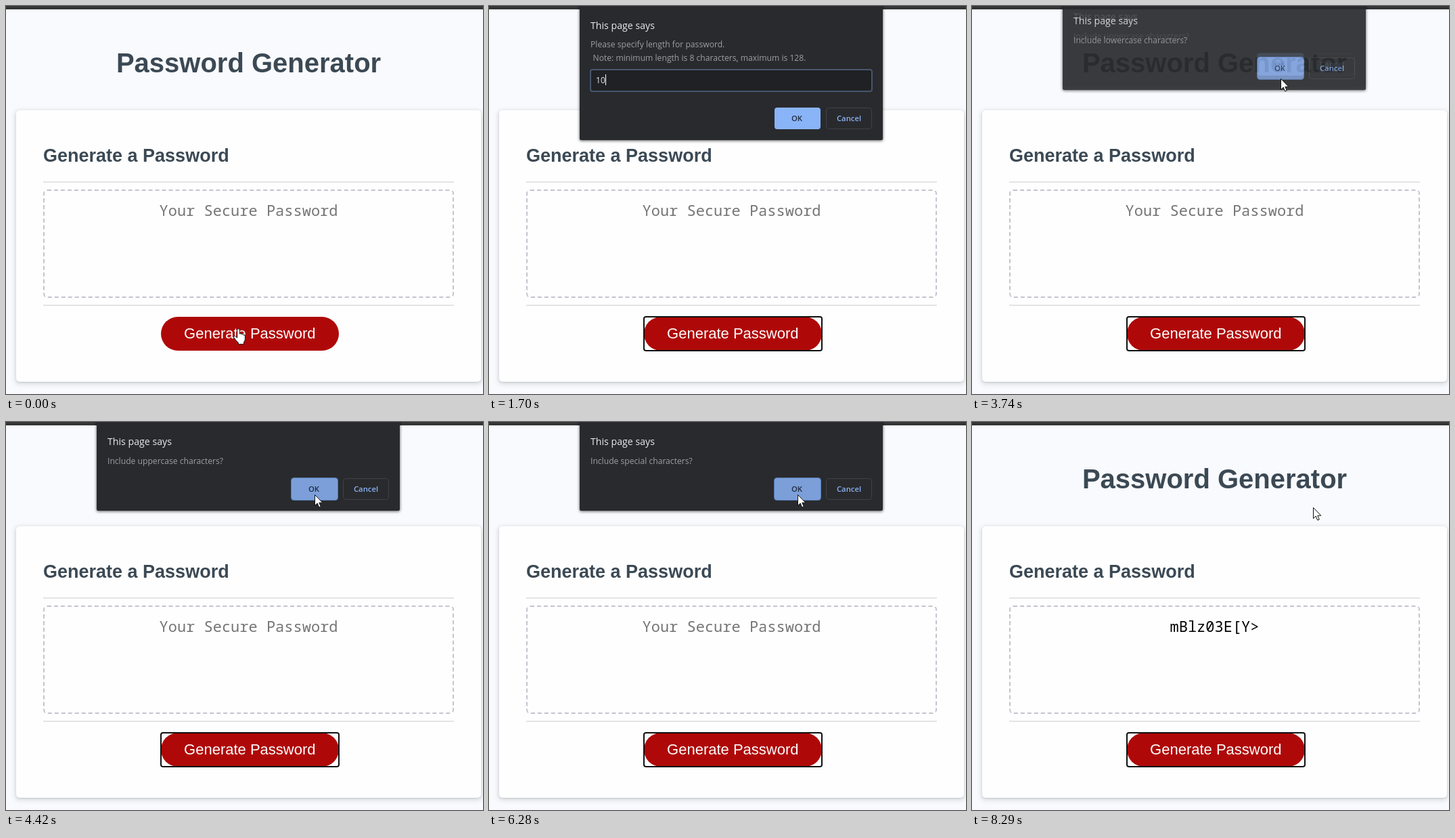
Recreate the animation shown at these times as an HTML page. Size 705 px wide and 573 px high, loop 9320 ms.

```html
<!DOCTYPE html>
<html lang="en">
<head>
<meta charset="utf-8">
<title>Password Generator</title>
<style>
  html, body { margin: 0; width: 100%; height: 100%; overflow: hidden; background: #f9fafd; }
  div, svg { position: absolute; box-sizing: border-box; }
  svg { left: 0; top: 0; }
  .bar { left: 0; top: 0; width: 705px; height: 5px; background: #353537; }
  .card { left: 15px; top: 154px; width: 687px; height: 401px; border-radius: 5px; background: #fefefe;
    box-shadow: 0 1px 2px rgba(60, 64, 67, .15), 0 2px 6px 2px rgba(60, 64, 67, .15); }
  .rule { left: 55px; width: 607px; height: 2px; background: #e4e4e7; }
  .field { left: 55px; top: 271px; width: 607px; height: 160px; border: 2px dashed #c4c4cf; border-radius: 6px; }
  .page { font-family: "Liberation Sans", Arial, sans-serif; }
  .heading { font-weight: bold; fill: #3b4954; }
  .mid { text-anchor: middle; }
  .mono { font: 22px "Noto Sans Mono", monospace; }
  .dialog { font: 12.15px "Open Sans", sans-serif; fill: #9aa0a6; white-space: pre; }
  .dialog .title { font-size: 14.17px; fill: #e8eaed; }
  .dialog .label { font-size: 11.3px; font-weight: 600; text-anchor: middle; }
  .panel { fill: #292a2d; filter: drop-shadow(0 1px 2px rgba(0, 0, 0, .65)); }
</style>
</head>
<body>
<div class="bar"></div>
<div class="card"></div>
<div class="rule" style="top:259px"></div>
<div class="rule" style="top:441px"></div>
<div class="field"></div>
<svg width="705" height="573" viewBox="0 0 705 573">
  <g class="page">
    <text class="heading mid" x="358.5" y="98" font-size="40">Password Generator</text>
    <text class="heading" x="55" y="230" font-size="27">Generate a Password</text>
    <rect x="229" y="459" width="263" height="50" rx="25" fill="#af0808"/>
    <text class="mid" x="360.3" y="491" font-size="22" fill="#fff">Generate Password</text>
  </g>
  <g id="scene"></g>
</svg>
<script>
const LOOP = 9320;
const scene = document.getElementById("scene");

// Each track lists [start time, value]; the latest started value applies.
const cursors = [
  [0, ["hand", 336, 476]], [1020, null], [2030, ["arrow", 378, 138]], [2380, ["hand", 450, 159]],
  [2730, ["arrow", 456, 121]], [3060, ["arrow", 456, 107]], [8290, ["arrow", 504, 126]]
];
const typed = [[0, ""], [1350, "1"], [1700, "10"]];
const ask = kind => `Include ${kind}?`;
const lower = ask("lowercase characters"), upper = ask("uppercase characters");
const numbers = ask("numbers"), special = ask("special characters");
const dialogs = [
  [0, []], [680, ["prompt"]], [2380, [lower]], [3740, [lower, upper]], [4090, [upper]],
  [5100, [upper, numbers]], [5450, [numbers]], [6150, [numbers, special]], [6280, [special]],
  [7210, [special, special]], [7360, [special]], [8290, []]
];
const at = (track, t) => track.findLast(([start]) => start <= t)[1];

const shapes = {
  arrow: "M.5.5V16.5L4.2 13L6.7 19L9.3 18L6.8 12.2H11.8Z",
  hand: "M5.7 14.2V2.6C5.7.2 9.3.2 9.3 2.6V8.2C10.5 7.2 12 7.6 12.2 9" +
    "C13.4 8.3 14.7 8.8 14.9 10C16.4 9.5 17.4 10.3 17.4 11.7V15.5C17.4 18.5 15.8 19.3 15.6 21" +
    "V23.4H7.4V21.3C5.2 19.3 2.8 16.5 1 13.9C-.2 12 2 10.6 3.5 12Z"
};

function text(x, y, content, attrs = "") {
  return `<text x="${x}" y="${y}" ${attrs}>${content}</text>`;
}

function cursor([shape, x, y]) {
  return `<path d="${shapes[shape]}" transform="translate(${x} ${y})" fill="#fff" stroke="#111" stroke-linejoin="round"/>`;
}

function buttons(y, hover) {
  const ok = hover
    ? `x="421.5" y="${y - .5}" width="69" height="33" fill="#7c9fda" stroke="#557db5"`
    : `x="422" y="${y}" width="68" height="32" fill="#8ab4f8"`;
  return `<rect ${ok} rx="4"/>` + text(455, y + 20, "OK", 'class="label" fill="#202b40"') +
    `<rect x="498.5" y="${y + .5}" width="67" height="31" rx="4" fill="none" stroke="#3f4247"/>` +
    text(532, y + 20, "Cancel", 'class="label" fill="#8ab4f8"');
}

function promptBody(t) {
  const value = at(typed, t);
  return text(150, 61, "Please specify length for password.") +
    text(153.5, 81, "Note: minimum length is 8 characters, maximum is 128.") +
    '<rect x="150" y="94" width="416" height="32" rx="3" fill="#202124" stroke="#47566f" stroke-width="2"/>' +
    text(158, 114, value, 'fill="#e8eaed"') +
    `<rect x="${158 + 7 * value.length}" y="101" width="1" height="16" fill="#fff"/>` +
    buttons(150, t >= 2030);
}

function dialog(message, t, shift = 0, opacity = 1) {
  const isPrompt = message === "prompt";
  const body = isPrompt ? promptBody(t) : text(150, 62, message) + buttons(83, true);
  return `<g class="dialog" transform="translate(0 ${shift})" opacity="${opacity}">
    <rect class="panel" x="134" y="-20" width="448" height="${isPrompt ? 218 : 151}" rx="2"/>
    ${text(150, 34, "This page says", 'class="title"')}${body}</g>`;
}

function draw(t) {
  const done = t >= 8290;
  let out = text(358.5, 310, done ? "mBlz03E[Y&gt;" : "Your Secure Password",
    `class="mono mid" fill="${done ? "#000" : "#757575"}"`);
  if (t >= 680) {
    out += '<rect x="229" y="459" width="263" height="50" rx="3" fill="none" stroke="#101010" stroke-width="2"/>';
  }
  const [current, next] = at(dialogs, t);
  if (next) out += dialog(current, t, -7, .9) + dialog(next, t, -13, .15);
  else if (current) out += dialog(current, t);
  const pointer = at(cursors, t);
  return pointer ? out + cursor(pointer) : out;
}

const begin = performance.now();
let shown = "";
function tick() {
  const markup = draw((performance.now() - begin) % LOOP);
  if (markup !== shown) scene.innerHTML = shown = markup;
  requestAnimationFrame(tick);
}
tick();
</script>
</body>
</html>
```
